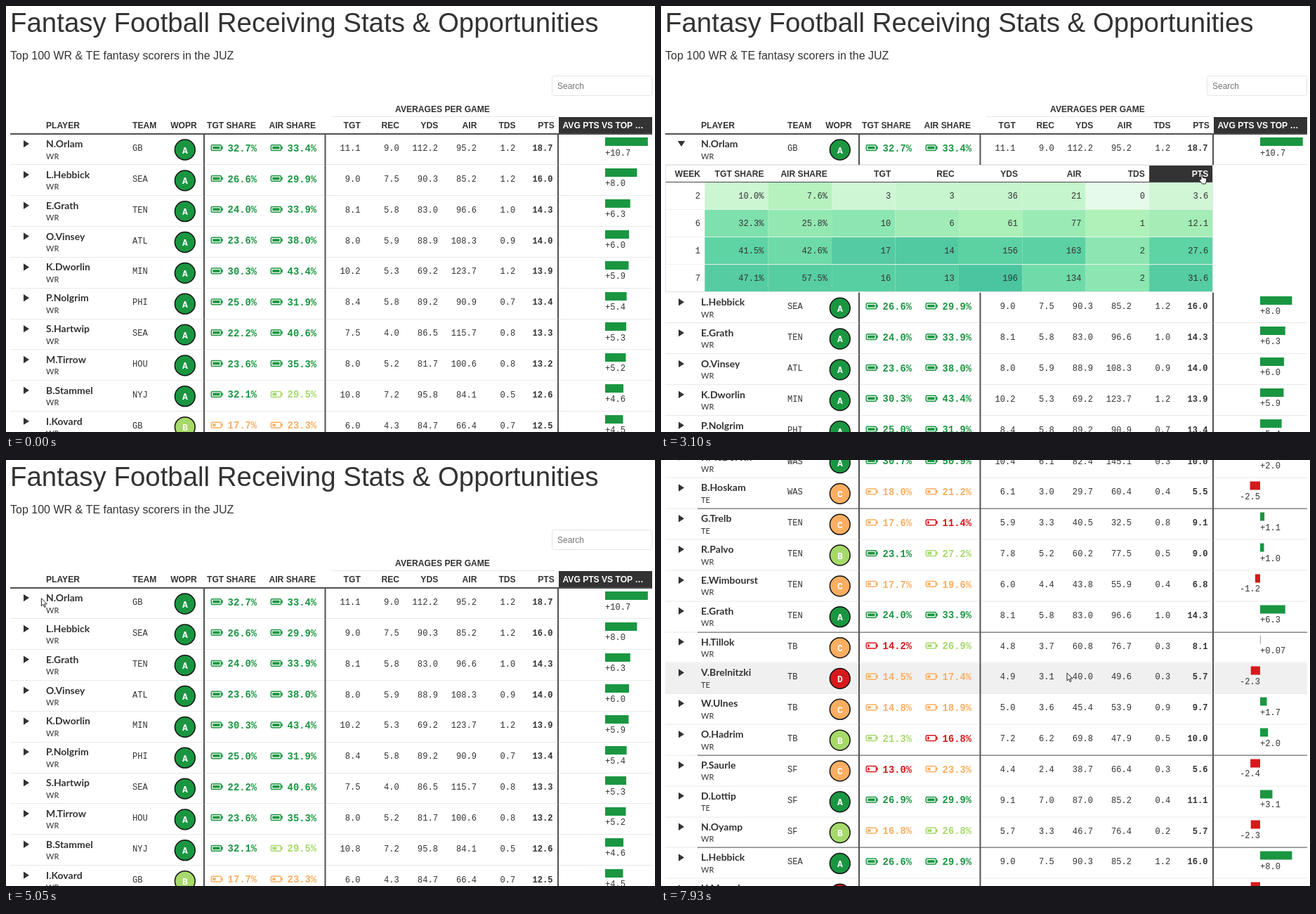
An HTML page with a canvas for the animation above (8 s loop, 924 by 606 pixels).

```html
<!DOCTYPE html>
<html lang="en">
<head>
<meta charset="utf-8">
<title>Receiving Stats</title>
<style>
html, body { margin: 0; width: 100%; height: 100%; overflow: hidden; background: #fff; }
canvas { display: block; }
</style>
</head>
<body>
<canvas id="stage" width="924" height="606"></canvas>
<script>
const ctx = document.getElementById('stage').getContext('2d');
const LOOP = 8000, TOP = 182.5, ROW = 43.84, DETAIL = 181.3;
const SANS = '"Liberation Sans", Arial, sans-serif';
const LATO = 'Lato, sans-serif';
const MONO = '"Liberation Mono", monospace';
const INK = '#333', LINE = '#505050', HOVER = '#d9d9d9';
const LEVELS = ['#1a9641', '#a6d96a', '#fdae61', '#d7191c'];
const CHARGE = [1, 0.6, 0.42, 0.25];
const TEAM_TARGETS = 33.8, TEAM_AIR = 285, BASELINE = 8.03;

const level = (value, cuts) => cuts.filter(cut => value < cut).length;
const clamp = p => Math.min(1, Math.max(0, p));
const smooth = p => p * p * (3 - 2 * p);

// Everything but the shares, catches, yards and points follows from them.
function player(line) {
  const [name, pos, team, ...numbers] = line.trim().split(' ');
  const [tgt, air, rec, yds, pts] = numbers.map(Number);
  const gap = pts - BASELINE;
  const touchdowns = (pts - yds / 10) / 6;
  return {
    name, pos, team, tgt, air, gap,
    grade: level(1.5 * tgt + 0.7 * air, [55, 42.5, 34.2]),
    stats: [tgt * TEAM_TARGETS / 100, rec, yds, air * TEAM_AIR / 100, touchdowns, pts].map(v => v.toFixed(1)),
    label: (gap > 0 ? '+' : '') + gap.toFixed(Math.abs(gap) < 0.1 ? 2 : 1)
  };
}
const parse = text => text.trim().split('\n').map(player);

const byPoints = parse(`
  N.Orlam WR GB 32.7 33.4 9.0 112.2 18.7
  L.Hebbick WR SEA 26.6 29.9 7.5 90.3 16.0
  E.Grath WR TEN 24.0 33.9 5.8 83.0 14.3
  O.Vinsey WR ATL 23.6 38.0 5.9 88.9 14.0
  K.Dworlin WR MIN 30.3 43.4 5.3 69.2 13.9
  P.Nolgrim WR PHI 25.0 31.9 5.8 89.2 13.4
  S.Hartwip WR SEA 22.2 40.6 4.0 86.5 13.3
  M.Tirrow WR HOU 23.6 35.3 5.2 81.7 13.2
  B.Stammel WR NYJ 32.1 29.5 7.2 95.8 12.6
  I.Kovard WR GB 17.7 23.3 4.3 84.7 12.5`);

const byTeam = parse(`
  F.McDorvin WR WAS 30.7 50.9 6.1 82.4 10.0
  B.Hoskam TE WAS 18.0 21.2 3.0 29.7 5.5
  G.Trelb TE TEN 17.6 11.4 3.3 40.5 9.1
  R.Palvo WR TEN 23.1 27.2 5.2 60.2 9.0
  E.Wimbourst WR TEN 17.7 19.6 4.4 43.8 6.8
  H.Tillok WR TB 14.2 26.9 3.7 60.8 8.1
  V.Brelnitzki TE TB 14.5 17.4 3.1 40.0 5.7
  W.Ulnes WR TB 14.8 18.9 3.6 45.4 9.7
  O.Hadrim WR TB 21.3 16.8 6.2 69.8 10.0
  P.Saurle WR SF 13.0 23.3 2.4 38.7 5.6
  D.Lottip TE SF 26.9 29.9 7.0 87.0 11.1
  N.Oyamp WR SF 16.8 26.8 3.3 46.7 5.7`);
byTeam.splice(5, 0, byPoints[2]);
byTeam.push(byPoints[1], { ...byTeam[7], name: 'U.Merrol', team: 'SEA' });

// week, shares, targets, catches, yards, air yards, touchdowns
const weeks = ['1 41.5% 42.6% 17 14 156 163 2', '2 10.0% 7.6% 3 3 36 21 0',
  '6 32.3% 25.8% 10 6 61 77 1', '7 47.1% 57.5% 16 13 196 134 2'].map(line => {
  const cells = line.split(' ');
  const points = cells[5] / 10 + cells[7] * 6;
  return { points, cells: [...cells, points.toFixed(1)] };
});
const rising = [...weeks].sort((a, b) => a.points - b.points);
const falling = [...rising].reverse();

const COLUMNS = [['TGT SHARE', 4, 53], ['AIR SHARE', -10, 69], ['TGT', 1, 19], ['REC', 1, 15],
  ['YDS', 8, 196], ['AIR', -13, 210], ['TDS', 0, 4], ['PTS', 0, 36]];
const WEEK_HEADS = ['WEEK', ...COLUMNS.map(column => column[0])];
const RAMP = ['#e6faea', '#b0f1b9', '#8ce6b1', '#5fd4a4', '#4bc4a0'];

const STAT_HEADS = WEEK_HEADS.slice(3);
const statX = i => 504.5 + i * 55.2 - (i === 5 ? 2 : 0);

// start, end, x, y of each pointer move
const MOVES = [
  [70, 850, 31, 238], [920, 1320, 31, 194], [1470, 2250, 751, 277], [2340, 2980, 770, 239],
  [3970, 4350, 180, 231], [4350, 4740, 31, 195], [4980, 5280, 168, 208], [5450, 5830, 205, 167],
  [6930, 7540, 502, 281], [7540, 7850, 578, 303]
];
const ARROW = new Path2D('M0 0V11L2.6 8.6L4.4 12.6L6 11.9L4.3 8H8Z');
const HAND = new Path2D('M-1 8V1.2a1.1 1.1 0 0 1 2.2 0V5l4.2 1a1.5 1.5 0 0 1 1.1 1.5V10l-1.2 4H.5L-2.9 9.4a1 1 0 0 1 1.9-1.4Z');
const BEAM = new Path2D('M-2.5-5.5H2.5M0-5.5V5.5M-2.5 5.5H2.5');

function text(str, x, y, font, color = INK, align = 'left') {
  ctx.font = font;
  ctx.fillStyle = color;
  ctx.textAlign = align;
  ctx.fillText(str, x, y);
}
function rect(x, y, w, h, color) {
  ctx.fillStyle = color;
  ctx.fillRect(x, y, w, h);
}
const head = (str, x, y, align, color) => text(str, x, y, `bold 12.1px ${SANS}`, color, align);
const mono = (str, x, y, align, weight = '') => text(str, x, y, `${weight} 12.1px ${MONO}`, INK, align);

function rampColor(p) {
  const pos = clamp(p) * (RAMP.length - 1), i = Math.min(RAMP.length - 2, Math.floor(pos));
  return `color-mix(in srgb, ${RAMP[i + 1]} ${((pos - i) * 100).toFixed(1)}%, ${RAMP[i]})`;
}

function pointerAt(t) {
  if (t < MOVES[0][0]) return null;
  let x = 862, y = 594;
  for (const [start, end, toX, toY] of MOVES) {
    const p = smooth(clamp((t - start) / (end - start)));
    x += (toX - x) * p;
    y += (toY - y) * p;
  }
  return { x, y };
}

function share(value, x, y, rank) {
  const color = LEVELS[rank];
  ctx.strokeStyle = color;
  ctx.lineWidth = 1.5;
  ctx.beginPath();
  ctx.roundRect(x + .8, y + 15.2, 14.2, 7.8, 1.5);
  ctx.stroke();
  rect(x + 15, y + 17.1, 2.2, 4, color);
  rect(x + 2.8, y + 17.2, 10.2 * CHARGE[rank], 3.8, color);
  text(value.toFixed(1) + '%', x + 65.5, y + 24.2, `bold 13.8px ${MONO}`, color, 'right');
}

function triangle(y, open) {
  ctx.save();
  ctx.translate(29, y + 13.6);
  if (open) ctx.rotate(Math.PI / 2);
  ctx.fillStyle = INK;
  ctx.beginPath();
  ctx.moveTo(-4, -5.2);
  ctx.lineTo(4, 0);
  ctx.lineTo(-4, 5.2);
  ctx.fill();
  ctx.restore();
}

function badge(grade, y) {
  ctx.beginPath();
  ctx.arc(254.8, y + 22, 14.4, 0, 7);
  ctx.fillStyle = LEVELS[grade];
  ctx.fill();
  ctx.lineWidth = 1.5;
  ctx.strokeStyle = '#111';
  ctx.stroke();
  text('ABCD'[grade], 254.8, y + 27, `bold 13px ${MONO}`, '#fff', 'center');
}

function drawRow(row, y, { open, hover, groupEnd }) {
  const bottom = Math.round(y + ROW) - 1;
  if (hover) rect(6, y, 914, ROW, '#f0f0f0');
  rect(6, bottom, 914, 1, '#e9e9e9');
  if (groupEnd) rect(52, bottom, 868, 1.3, '#777');
  for (const x of [281, 453.5, 785]) rect(x, y, 2, ROW, LINE);
  triangle(y, open);
  text(row.name, 57, y + 18.5, `bold 14px ${LATO}`);
  text(row.pos, 57, y + 35, `11px ${LATO}`);
  mono(row.team, 180, y + 23.5);
  badge(row.grade, y);
  share(row.tgt, 291.5, y, level(row.tgt, [22, 20, 14.4]));
  share(row.air, 376.5, y, level(row.air, [29.8, 24, 17]));
  row.stats.forEach((value, i) => mono(value, statX(i), y + 23.5, 'right', i === 5 ? 'bold' : ''));

  const width = Math.abs(row.gap) * 5.7, down = row.gap < 0, barY = Math.round(y + 4.9);
  if (width < 1) rect(853, barY, .8, 12, '#888');
  else rect(down ? 853 - width : 853, barY, width, 12, LEVELS[down ? 3 : 0]);
  mono(row.label, 853, y + 30, down ? 'right' : 'left');
}

function drawDetail(t, mouse) {
  const order = t < 3080 ? weeks : t < 3820 ? rising : falling;
  const right = i => 62.3 + i * 90.4;
  const inHead = mouse.y > 227 && mouse.y < 251;

  WEEK_HEADS.forEach((label, i) => {
    const left = i ? right(i - 1) : 6;
    const active = i === 8 && t >= 3080;
    const hover = inHead && mouse.x > left && mouse.x < right(i);
    if (active || hover) rect(left, 227, right(i) - left, 23, active ? INK : HOVER);
    head(label, right(i) - 6.2, 243, 'right', active ? '#fff' : INK);
  });

  order.forEach(({ cells }, n) => {
    const y = 250.8 + n * 39.1;
    if (mouse.y > y && mouse.y < y + 39 && mouse.x < 786) rect(6, y, 56, 38.3, '#f1f1f1');
    cells.forEach((value, i) => {
      if (i) {
        const [, low, high] = COLUMNS[i - 1];
        rect(right(i - 1), y, 90.4, 38.3, rampColor((parseFloat(value) - low) / (high - low)));
      }
      mono(value, right(i) - 6.2, y + 23, 'right');
    });
    rect(6, y + 38.3, 780, .8, '#e4efe7');
  });
  rect(6, 250, 780, 1, '#444');
  ctx.strokeStyle = '#e4e4e4';
  ctx.lineWidth = 1;
  ctx.strokeRect(6.5, 226.5, 779, 180);
}

function drawHeader(t, mouse) {
  text('Fantasy Football Receiving Stats & Opportunities', 6, 36.5, `38.45px ${SANS}`);
  text('Top 100 WR & TE fantasy scorers in the JUZ', 6, 76.3, `16px ${SANS}`);
  ctx.strokeStyle = '#e4e4e4';
  ctx.lineWidth = 1;
  ctx.beginPath();
  ctx.roundRect(777.5, 99.5, 142, 28, 3);
  ctx.stroke();
  text('Search', 785, 117.5, `12px ${SANS}`, '#757575');

  const teamOn = t >= 6060, pointsOn = t < 6290;
  const teamHover = mouse && mouse.x > 174 && mouse.x < 226 && mouse.y > 158 && mouse.y < 182;
  if (teamOn || teamHover) rect(174, 158, 52, 24, teamOn ? INK : HOVER);
  if (pointsOn) rect(787, 158, 133, 24, INK);

  head('AVERAGES PER GAME', 621.5, 151, 'center');
  rect(464, 157, 317, 1, '#e6e6e6');
  head('PLAYER', 57, 174);
  head('TEAM', 180, 174, 'left', teamOn ? '#fff' : INK);
  head('WOPR', 253, 174, 'center');
  head('TGT SHARE', 286, 174);
  head('AIR SHARE', 374.5, 174);
  STAT_HEADS.forEach((label, i) => head(label, 504.8 + i * 55.2, 174, 'right'));
  head('AVG PTS VS TOP …', 792.5, 174, 'left', pointsOn ? '#fff' : INK);
  rect(6, 181, 914, 2, LINE);
}

function drawPointer(t, { x, y }, open) {
  const onHead = (t > 5700 && t < 7000 && y < 182) || (open && y > 227 && y < 251);
  const shape = t > 2180 && t < 2400 ? BEAM : onHead || x < 50 ? HAND : ARROW;
  ctx.save();
  ctx.translate(x, y);
  ctx.lineWidth = 1;
  ctx.strokeStyle = '#222';
  ctx.fillStyle = '#fff';
  if (shape !== BEAM) ctx.fill(shape);
  ctx.stroke(shape);
  ctx.restore();
}

function draw(t) {
  const mouse = pointerAt(t);
  const open = t >= 1470 && t < 4980;
  const sorted = t >= 6290;
  const rows = sorted ? byTeam : byPoints;
  const scroll = 200.5 * smooth(clamp((t - 7550) / 370));

  rect(0, 0, 924, 606, '#fff');
  ctx.save();
  ctx.translate(0, -scroll);
  rows.forEach((row, i) => {
    const y = TOP + i * ROW + (open && i ? DETAIL : 0);
    drawRow(row, y, {
      open: open && i === 0,
      hover: t > 6930 && mouse.y + scroll >= y && mouse.y + scroll < y + ROW,
      groupEnd: sorted && rows[i + 1] && rows[i + 1].team !== row.team
    });
  });
  if (open) drawDetail(t, mouse);
  drawHeader(t, mouse);
  ctx.restore();
  if (mouse) drawPointer(t, mouse, open);
}

const start = performance.now();
function tick() {
  draw((performance.now() - start) % LOOP);
  requestAnimationFrame(tick);
}
tick();
</script>
</body>
</html>
```
